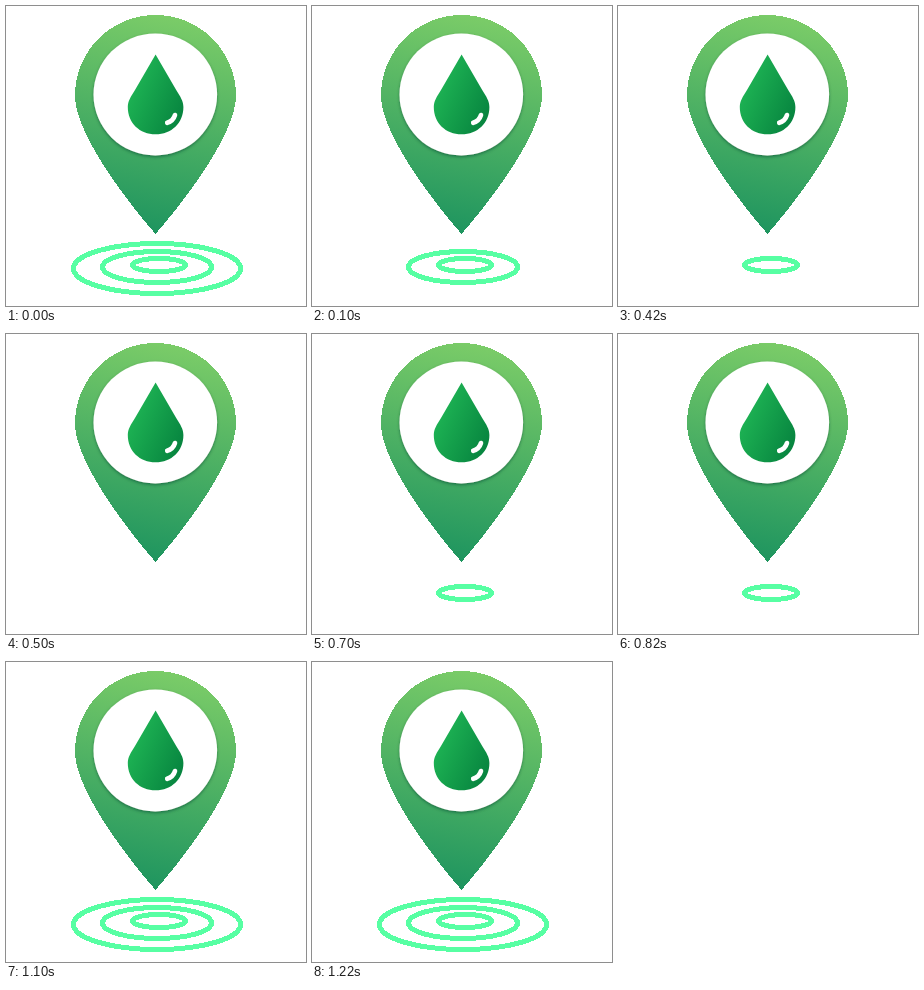
Write an HTML page that moves like this. It is 300 px wide and 300 px high and loops after 1.3 s.

```html
<!DOCTYPE html>
<html lang="en">
<head>
<meta charset="utf-8">
<title>Water pin</title>
<style>
  html, body { margin: 0; width: 100%; height: 100%; overflow: hidden; background: #fff; }
  svg { display: block; width: 300px; height: 300px; }
</style>
</head>
<body>
<svg viewBox="0 0 300 300">
  <defs>
    <linearGradient id="pinFill" x1=".58" y1="0" x2=".42" y2="1">
      <stop offset="0" stop-color="#7bcc68"/>
      <stop offset="1" stop-color="#1d945f"/>
    </linearGradient>
    <linearGradient id="dropFill" x1=".05" y1=".3" x2=".95" y2=".85">
      <stop offset="0" stop-color="#1fb655"/>
      <stop offset="1" stop-color="#07843f"/>
    </linearGradient>
    <filter id="shadow" x="-10%" y="-10%" width="120%" height="120%">
      <feDropShadow dx="0" dy="1.5" stdDeviation="1.5" flood-color="#043" flood-opacity=".55"/>
    </filter>
  </defs>

  <path fill="url(#pinFill)" shape-rendering="crispEdges"
    d="M149.5 228C114 187 69 125 69 89.5a80.5 80.5 0 0 1 161 0C230 125 185 187 149.5 228Z"/>
  <ellipse cx="149.3" cy="88.5" rx="61.8" ry="61" fill="#fff" filter="url(#shadow)"/>
  <path fill="url(#dropFill)"
    d="M149.6 48.5L170.2 84C174.5 91 177.4 95 177.4 101C177.4 117 165.5 128.3 149.6 128.3S121.8 117 121.8 101C121.8 95 124.7 91 129 84Z"/>
  <path d="M169 109Q167.3 114.8 161.2 116.8" fill="none" stroke="#fff" stroke-width="4.6" stroke-linecap="round"/>

  <g id="rings" fill="none" stroke="#57ffa3" stroke-width="5" shape-rendering="crispEdges">
    <ellipse cx="153" cy="259" rx="26.5" ry="6.5"/>
    <ellipse cx="151" cy="261" rx="54.5" ry="15.5"/>
    <ellipse cx="151" cy="262.5" rx="83.5" ry="25"/>
  </g>
</svg>
<script>
  const rings = [...document.querySelectorAll('#rings ellipse')];
  const LOOP = 1300, STEP = 200, FIRST = 100;
  const start = performance.now();

  // Rings vanish from the outside in, then return from the inside out.
  function draw(now) {
    const time = Math.max(0, now - start) % LOOP;
    const step = Math.floor((time + STEP - FIRST) / STEP);
    const count = Math.abs(3 - step);
    rings.forEach((ring, i) => ring.style.display = i < count ? '' : 'none');
    requestAnimationFrame(draw);
  }
  draw(start);
</script>
</body>
</html>
```
